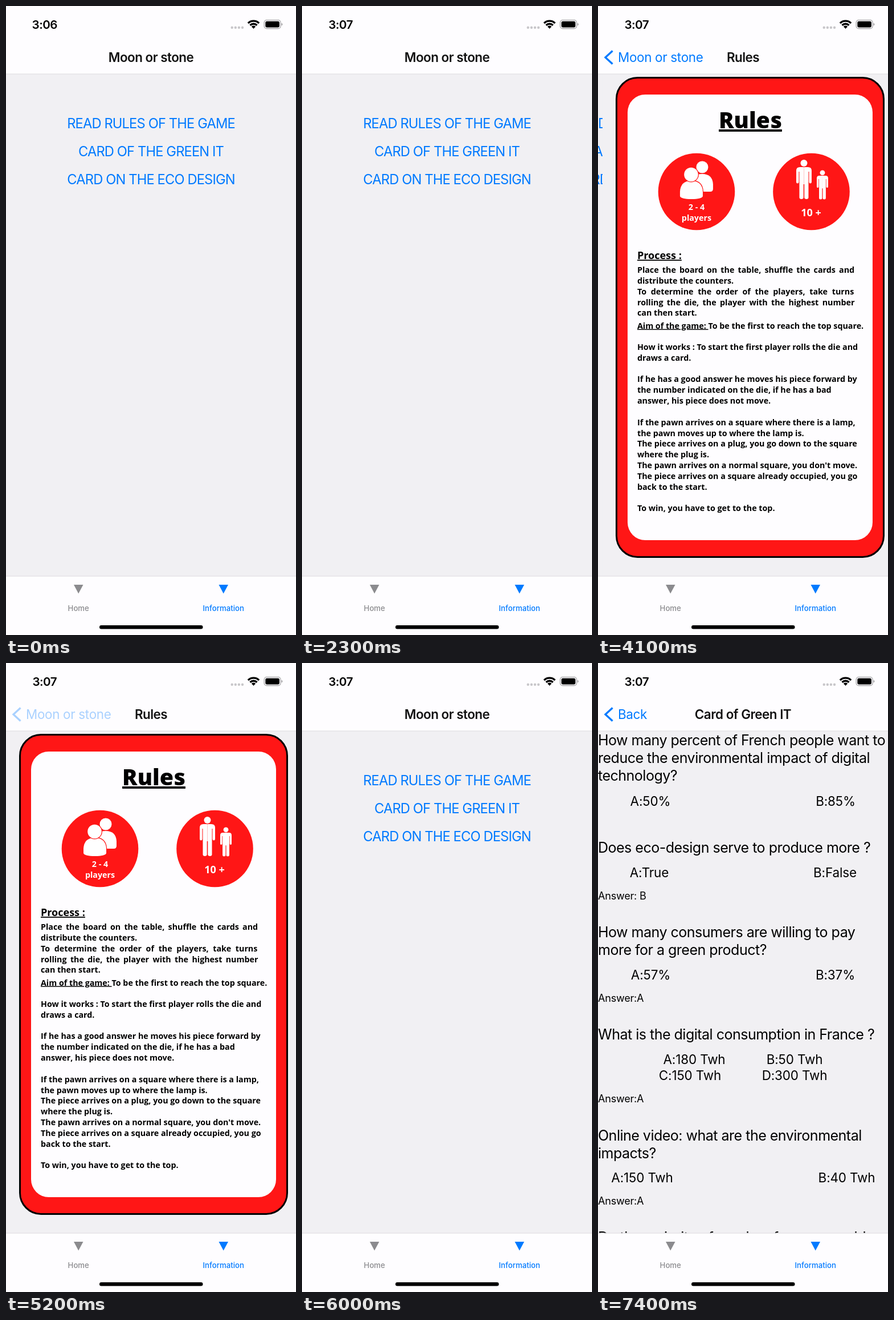
Animation, 509 px wide and 1101 px high, one loop 8 s. Source, as an HTML page:

```html
<!DOCTYPE html>
<html lang="en">
<head>
<meta charset="utf-8">
<title>Board game app</title>
<style>
  html, body { margin: 0; width: 100%; height: 100%; overflow: hidden; background: #fefdff; }
  svg { display: block; width: 100vw; height: 100vh; }
  text { font-family: Inter, "Liberation Sans", sans-serif; }
  .mid { text-anchor: middle; }
  .blue { fill: #007aff; }
  .title { font-size: 22.4px; font-weight: 600; letter-spacing: -.5px; fill: #111; }
  .back { font-size: 22.4px; letter-spacing: -.3px; }
  .link { font-size: 23.7px; letter-spacing: -.86px; }
  .clock { font-size: 20.6px; font-weight: 600; letter-spacing: -.5px; }
  .tab { font-size: 13.2px; font-weight: 500; }
  .question { font-size: 25px; letter-spacing: -.5px; }
  .choice { font-size: 22.4px; letter-spacing: -.1px; }
  .answer { font-size: 18px; letter-spacing: -.2px; }
  .card text { font-family: "Open Sans", "DejaVu Sans", sans-serif; font-weight: 700; font-size: 14.27px; }
  .card .head { font-size: 39.3px; font-weight: 800; }
  .card .sub { font-size: 18px; }
  .card .age { font-size: 18px; }
  .card .white { fill: #fff; }
  .line { text-decoration: underline; }
</style>
</head>
<body>
<svg viewBox="0 0 509 1101" preserveAspectRatio="none">
  <rect width="509" height="1101" fill="#f1f0f3"/>
  <g id="menu"></g>

  <g id="rules" class="card">
    <rect y="119" width="509" height="880" fill="#f1f0f3"/>
    <rect x="24.5" y="125.5" width="469" height="839" rx="37" fill="#ff1616" stroke="#000" stroke-width="3"/>
    <rect x="44" y="155" width="430" height="780" rx="31" fill="#fefdff"/>
    <text class="head mid line" x="259.5" y="214">Rules</text>
    <g fill="#ff1616">
      <circle cx="165" cy="325" r="67.3"/>
      <circle cx="366.5" cy="325" r="67.3"/>
    </g>
    <g fill="#fff">
      <circle cx="175" cy="282" r="10.5"/>
      <path d="M155 325V311Q156 294 175 294Q193 294 194 312V320Q194 325 189 325Z"/>
      <g stroke="#ff1616" stroke-width="2.4" paint-order="stroke">
        <path d="M136 333V325Q137 306 155.5 306Q175 306 176 325V333Q174 338 156 338Q138 338 136 333Z"/>
        <circle cx="155.5" cy="295" r="12.3"/>
      </g>
      <g id="people"></g>
    </g>
    <text class="white mid" x="165" y="357">2 - 4</text>
    <text class="white mid" x="165" y="376">players</text>
    <text class="age white mid" x="366" y="367.5">10 +</text>
    <text class="sub line" x="61" y="443">Process :</text>
    <text x="61" y="564.5"><tspan class="line">Aim of the game: </tspan>To be the first to reach the top square.</text>
    <g id="body"></g>
  </g>

  <g id="quiz">
    <rect y="119" width="509" height="880" fill="#f1f0f3"/>
  </g>

  <rect width="509" height="119" fill="#fefdff"/>
  <rect y="118.5" width="509" height="1" fill="#dddcdf"/>
  <text id="title" class="title mid" y="98"></text>
  <text id="pageTitle" class="title mid" y="98"></text>
  <g id="back">
    <path d="M25.5 78.5L13 90L25.5 101.5" fill="none" stroke="#007aff" stroke-width="3.3"/>
    <text id="backLabel" class="back blue" y="98"></text>
  </g>

  <text id="clock" class="clock mid" x="67.8" y="40"></text>
  <g id="dots" fill="#c8c7ca"></g>
  <g id="wifi" fill="none" stroke="#000" stroke-width="3.4"></g>
  <rect x="453.2" y="24.7" width="28.8" height="14.8" rx="4.3" fill="none" stroke="#a3a2a5" stroke-width="1.3"/>
  <rect x="455.3" y="26.8" width="24.6" height="10.6" rx="2.6"/>
  <path d="M483.5 29.8Q485.5 30.5 485.5 32.1Q485.5 33.7 483.5 34.4Z" fill="#a3a2a5"/>

  <rect y="998" width="509" height="103" fill="#fefdff"/>
  <rect y="997.5" width="509" height="1" fill="#dddcdf"/>
  <g id="homeTab"><path d="M119 1013H135.5L127.2 1028.5Z"/><text class="tab mid" x="127.2" y="1058.5">Home</text></g>
  <g id="infoTab"><path d="M373.5 1013H390L381.7 1028.5Z"/><text class="tab mid" x="381.7" y="1058.5">Information</text></g>
  <rect x="164" y="1084" width="181.5" height="6.5" rx="3.25"/>
</svg>

<script>
const LOOP = 8000, STEP = 100, WIDTH = 509, CENTER = 254.5;
const APP_NAME = "Moon or stone";
const $ = id => document.getElementById(id);

function add(parent, tag, attrs, content = "") {
  const node = document.createElementNS("http://www.w3.org/2000/svg", tag);
  for (const key in attrs) node.setAttribute(key, attrs[key]);
  node.textContent = content;
  return parent.appendChild(node);
}

const links = ["READ RULES OF THE GAME", "CARD OF THE GREEN IT", "CARD ON THE ECO DESIGN"].map((label, i) =>
  add($("menu"), "text", { class: "link blue mid", x: CENTER, y: 213.5 + 49 * i }, label));

// Justified lines carry their extra word spacing.
[
  [466.5, "Place the board on the table, shuffle the cards and", 2.5],
  [485.5, "distribute the counters."],
  [504.5, "To determine the order of the players, take turns", 4],
  [523.5, "rolling the die, the player with the highest number", 2.7],
  [542, "can then start."],
  [601.5, "How it works : To start the first player rolls the die and"],
  [620.5, "draws a card."],
  [658, "If he has a good answer he moves his piece forward by"],
  [677, "the number indicated on the die, if he has a bad"],
  [696, "answer, his piece does not move."],
  [733.5, "If the pawn arrives on a square where there is a lamp,"],
  [752.5, "the pawn moves up to where the lamp is."],
  [771, "The piece arrives on a plug, you go down to the square"],
  [790, "where the plug is."],
  [809, "The pawn arrives on a normal square, you don't move."],
  [828, "The piece arrives on a square already occupied, you go"],
  [846.5, "back to the start."],
  [884, "To win, you have to get to the top."]
].forEach(([y, line, gap = 0]) => add($("body"), "text", { x: 61, y, "word-spacing": gap }, line));

[
  [144, "How many percent of French people want to"],
  [175, "reduce the environmental impact of digital"],
  [206, "technology?"],
  [332, "Does eco-design serve to produce more ?"],
  [480, "How many consumers are willing to pay"],
  [511, "more for a green product?"],
  [659, "What is the digital consumption in France ?"],
  [835.5, "Online video: what are the environmental"],
  [866.5, "impacts?"],
  [1014, "Do the majority of vendors favour reusable"]
].forEach(([y, line]) => add($("quiz"), "text", { class: "question", x: 0, y }, line));

[
  [249.5, 92, "A:50%", 417, "B:85%"],
  [375, 90, "A:True", 416, "B:False"],
  [554, 92.5, "A:57%", 416.5, "B:37%"],
  [702, 169, "A:180 Twh", 345, "B:50 Twh"],
  [730, 161.5, "C:150 Twh", 345, "D:300 Twh"],
  [909, 77.5, "A:150 Twh", 436.5, "B:40 Twh"]
].forEach(([y, x1, first, x2, second]) => {
  add($("quiz"), "text", { class: "choice mid", x: x1, y }, first);
  add($("quiz"), "text", { class: "choice mid", x: x2, y }, second);
});

[[414, "Answer: B"], [593, "Answer:A"], [769, "Answer:A"], [948, "Answer:A"]]
  .forEach(([y, line]) => add($("quiz"), "text", { class: "answer", x: 0, y }, line));

function person(x, y, scale) {
  const half = "M0 0H7Q13.5 0 13.5 6V26Q13.5 28.5 11.2 28.5Q9 28.5 9 26V8H8V53Q8 56 4.5 56Q.8 56 .8 53V30H0Z";
  const g = add($("people"), "g", { transform: `translate(${x} ${y}) scale(${scale})` });
  add(g, "circle", { cy: -7, r: 6 });
  add(g, "path", { d: half });
  add(g, "path", { d: half, transform: "scale(-1 1)" });
}
person(353.5, 282, 1);
person(386, 297, .74);

for (let i = 0; i < 4; i++) add($("dots"), "circle", { cx: 396.7 + 6.1 * i, cy: 37.7, r: 2.2 });

for (const r of [13.6, 8.5, 2.6]) {
  const d = r * Math.SQRT1_2;
  add($("wifi"), "path", {
    d: `M${434.5 - d} ${39.7 - d}A${r} ${r} 0 0 1 ${434.5 + d} ${39.7 - d}`,
    "stroke-width": r < 3 ? 5 : 3.4
  });
}

// Remaining part of a critically damped slide, 1 down to 0.
function remaining(t, start) {
  const u = Math.max(0, t - start) * .0175;
  const left = (1 + u) * Math.exp(-u);
  return left < .001 ? 0 : left;
}

const within = (t, from, to) => t >= from && t < to;
const shift = (node, x) => node.setAttribute("transform", `translate(${x} 0)`);

function placePage(node, shown) {
  node.style.display = shown ? "" : "none";
  shift(node, WIDTH * (1 - shown));
}

function draw(time) {
  const t = Math.floor(time / STEP) * STEP;
  const onHome = within(t, 500, 2300);
  const rules = t < 5350 ? 1 - remaining(t, 3750) : remaining(t, 5350);
  const quiz = 1 - remaining(t, 6850);
  const shown = Math.max(rules, quiz);
  const head = Math.min(1, shown * 1.02);

  $("clock").textContent = t < 900 ? "3:06" : "3:07";
  $("homeTab").setAttribute("fill", onHome ? "#007aff" : "#8b8b8e");
  $("infoTab").setAttribute("fill", onHome ? "#8b8b8e" : "#007aff");

  $("menu").style.display = onHome ? "none" : "";
  shift($("menu"), -.3 * WIDTH * shown);
  links[0].style.opacity = within(t, 3600, 3800) ? .2 : 1;
  links[1].style.opacity = within(t, 6700, 6900) ? .2 : 1;
  placePage($("rules"), rules);
  placePage($("quiz"), quiz);

  $("title").textContent = onHome ? "Home" : APP_NAME;
  $("title").setAttribute("x", CENTER - 144 * head);
  $("title").style.opacity = Math.max(0, 1 - 1.5 * head);
  $("pageTitle").textContent = quiz ? "Card of Green IT" : "Rules";
  $("pageTitle").setAttribute("x", CENTER + 200 * (1 - head));
  $("pageTitle").style.opacity = head;
  $("backLabel").textContent = quiz ? "Back" : APP_NAME;
  $("backLabel").setAttribute("x", 35 + 144 * (1 - head));
  $("back").style.opacity = head * (within(t, 5200, 5400) ? .33 : 1);
}

const begin = performance.now();
function tick() {
  draw((performance.now() - begin) % LOOP);
  requestAnimationFrame(tick);
}
tick();
</script>
</body>
</html>
```
